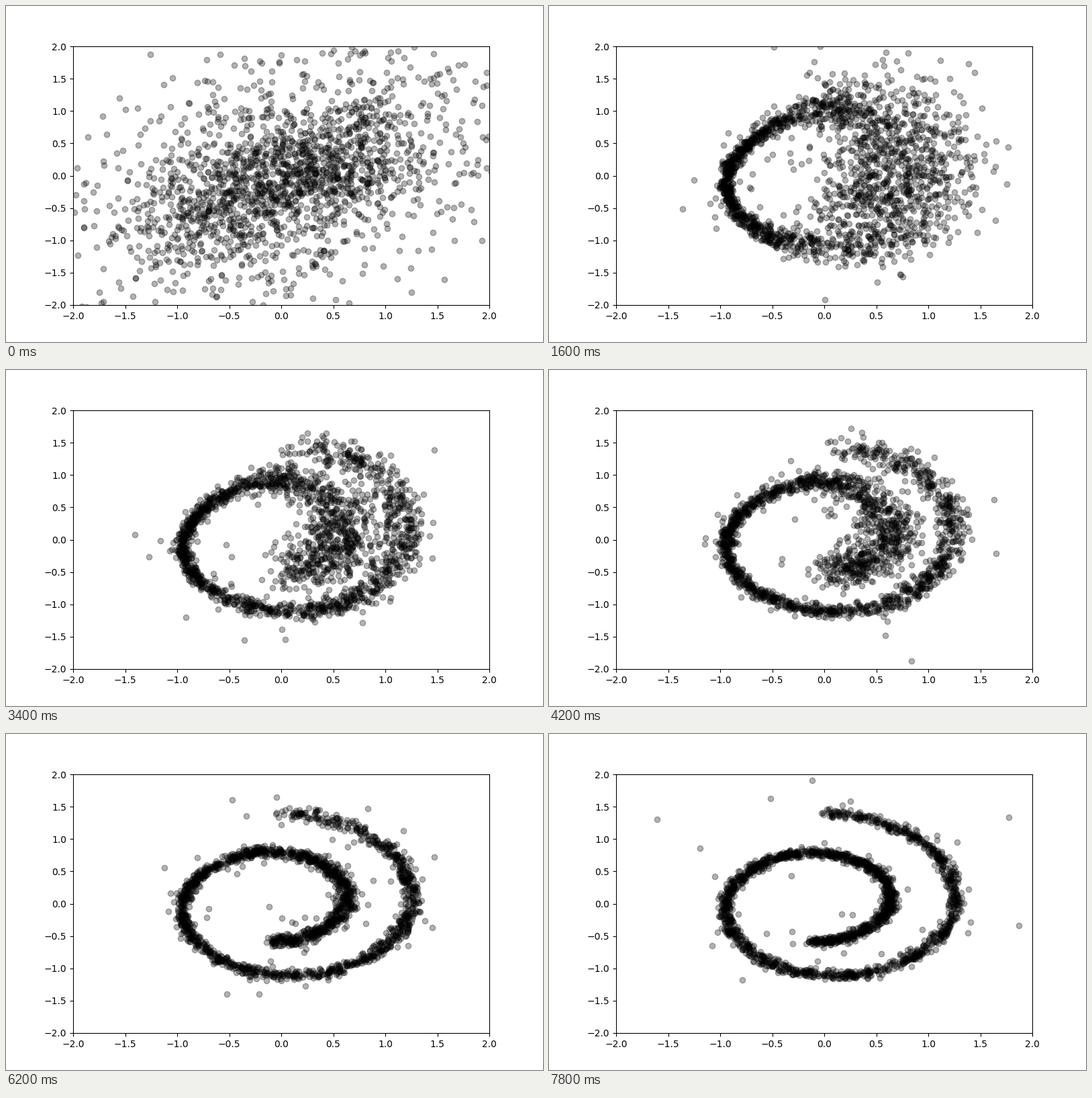
Recreate the animation shown at these times as a matplotlib script. Size 800x500 px, loop 8 s.

```python
import numpy as np
import matplotlib.pyplot as plt
from matplotlib.animation import FuncAnimation

FRAMES, INTERVAL, COUNT = 40, 200, 2000


def ease(x, start, end):
    k = np.clip((x - start) / (end - start), 0, 1)
    return k * k * (3 - 2 * k)


def spiral(rng, step):
    """A spiral whose left arc settles first, then outer coil, then inner coil."""
    inner_doubt = 1 - ease(step, 4, 35)
    outer_doubt = np.exp(-max(0, step - 8) / 7)

    u = rng.random(COUNT)
    u += 0.05 * inner_doubt * np.sin(2 * np.pi * u)  # crowd the left arc
    turn = 1.5 + 3 * u                               # in units of pi
    x = 0.1 * np.pi * turn * np.cos(np.pi * turn)
    y = 0.1 * np.pi * turn * np.sin(np.pi * turn)

    # The unsettled inner coil gathers into a blob; its tip stays a bit low.
    pull = 0.4 * inner_doubt * ease(turn, 2.5, 2.1)
    x += pull * (0.55 - x)
    y += pull * (-0.1 - y)
    tip = 0.11 * ease(turn, 2, 1.5) * (1 - inner_doubt)
    x -= tip
    y -= tip

    # The upper left side is lifted towards the free end of the outer coil.
    lift = inner_doubt * np.exp(-((turn - 2.55) / 0.28) ** 2)
    x += 0.18 * lift + 0.38 * inner_doubt * ease(turn, 4, 4.5)
    y += 0.24 * lift
    x -= 0.2 * outer_doubt * ease(turn, 3.5, 4)

    size = (0.036 + 0.26 * inner_doubt * ease(turn, 2.9, 2.1)
            + 0.24 * outer_doubt * ease(turn, 3.1, 4)
            + 0.05 * inner_doubt * ease(turn, 4, 4.5))
    pick = rng.random(COUNT)
    far = 0.009 * step / FRAMES
    size += 0.16 * (pick < 0.03 + 0.02 * inner_doubt) + 0.5 * (pick < far)
    return np.array([x, y]) + size * rng.normal(size=(2, COUNT))


def cloud(rng):
    wide = rng.random(COUNT) < 0.5
    a, b = rng.normal(size=(2, COUNT))
    x = 0.05 + np.where(wide, 1.2, 0.68) * a
    y = 0.42 * x - 0.05 + np.where(wide, 1.1, 0.47) * b
    return np.array([x, y])


def points(step):
    rng = np.random.default_rng(100 + step)
    mix = max(0, 1 - step / 8) ** 1.6
    return (1 - mix) * spiral(rng, step) + mix * cloud(rng)


fig, ax = plt.subplots(figsize=(8, 5), dpi=100)
ax.set(xlim=(-2, 2), ylim=(-2, 2))
dots, = ax.plot([], [], "ko", alpha=0.3)


def draw(step):
    dots.set_data(*points(step))
    return dots,


anim = FuncAnimation(fig, draw, frames=FRAMES, interval=INTERVAL,
                     repeat=True, repeat_delay=0)
plt.show()
```
